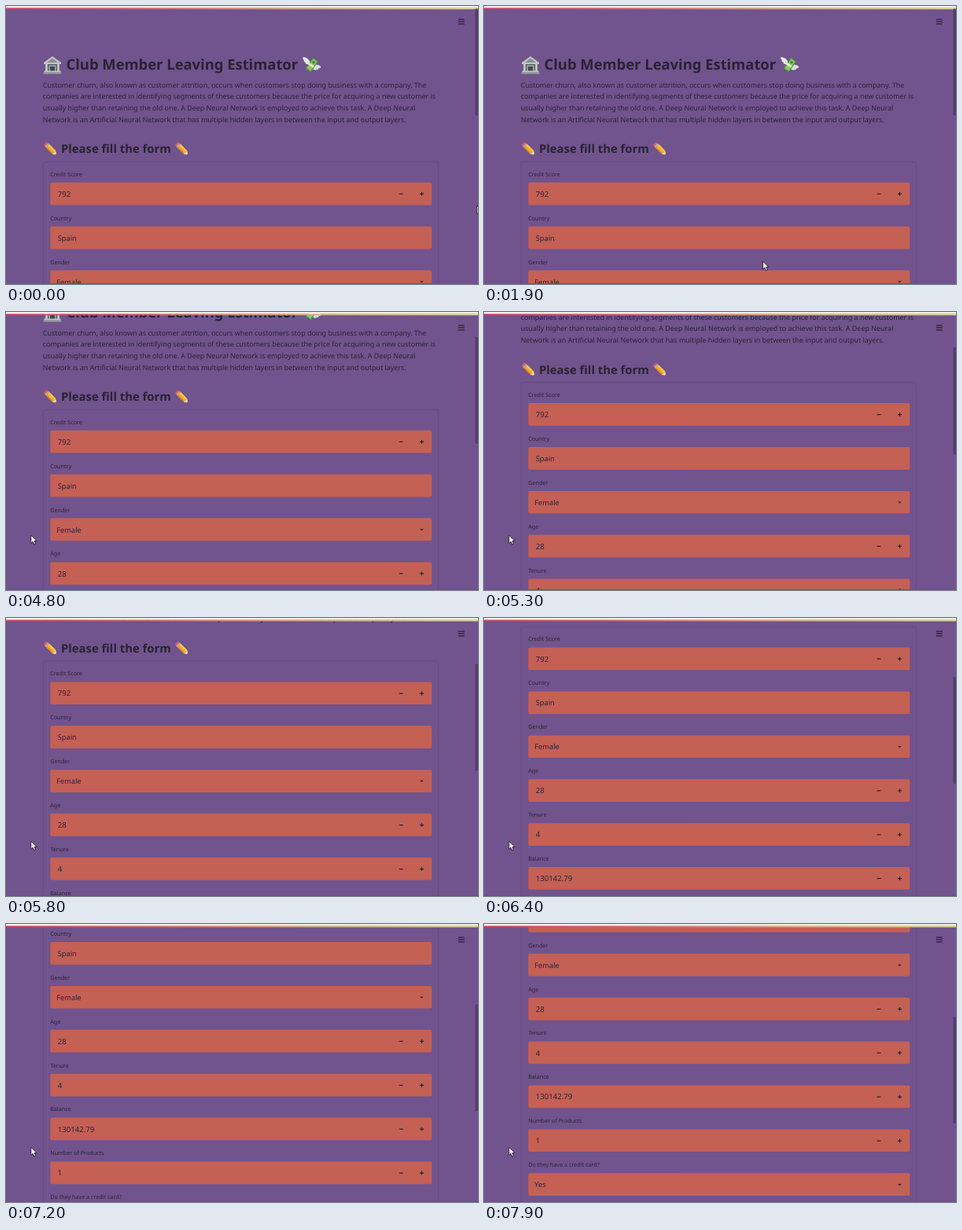
These frames come from a looping animation (600x354 px, 8000 ms). An HTML page:

```html
<!DOCTYPE html>
<html lang="en">
<head>
<meta charset="utf-8">
<title>Form scroll</title>
<style>
  html, body { margin: 0; width: 100%; height: 100%; overflow: hidden; background: #71538d; }
  svg { display: block; width: 600px; height: 354px; }
  text { font-family: "Noto Sans", "Open Sans", sans-serif; fill: #2b2438; text-rendering: geometricPrecision; }
  .title { font-size: 18.4px; font-weight: 700; fill: #282333; }
  .sub { font-size: 14.85px; font-weight: 700; fill: #282333; }
  .body { font-size: 8.92px; fill: #2a2339; }
  .label { font-size: 7.18px; fill: #2c2439; }
  .word { font-size: 9.25px; }
  .num { font-size: 9.65px; }
  .field { fill: #c56055; }
  .ink { fill: none; stroke: #2b2030; stroke-width: 1.25; }
</style>
</head>
<body>
<svg viewBox="0 0 600 354">
  <defs>
    <linearGradient id="stripe">
      <stop offset="0" stop-color="#cb3f66"/>
      <stop offset=".25" stop-color="#cf5f6c"/>
      <stop offset=".6" stop-color="#d9a57c"/>
      <stop offset="1" stop-color="#e0dd90"/>
    </linearGradient>
    <g id="pencil">
      <g transform="rotate(45)">
        <rect x="-10.500" y="-3" width="4" height="6" rx="1.600" fill="#dd5a68"/>
        <rect x="-7.800" y="-3" width="2" height="6" fill="#a9b4ba"/>
        <rect x="-5.800" y="-3" width="11.500" height="6" fill="#f5ac30"/>
        <rect x="-5.800" y="-3" width="11.500" height="2" fill="#fbc848"/>
        <rect x="-5.800" y="1.400" width="11.500" height="1.600" fill="#e28a24"/>
        <path d="M5.700-3 11 0 5.700 3z" fill="#f0d3a4"/>
        <path d="M9.200-1 11 0 9.200 1z" fill="#3a3234"/>
      </g>
    </g>
    <g id="bank">
      <path d="M1 8 12 0 23 8V10H1z" fill="#bfc5c4"/>
      <path d="M5 8 12 2.500 19 8z" fill="#858f92"/>
      <path d="M3 10H21V19H3z" fill="#5b6468"/>
      <path d="M4.500 10V19M19.500 10V19" stroke="#c9cdca" stroke-width="2.600"/>
      <path d="M7.500 11.500h9V19h-9z" fill="#a3aaa9"/>
      <path d="M9 13h6v6H9z" fill="#41484f"/>
      <path d="M1.500 18.500h21v2h-21z" fill="#c2c6c1"/>
      <path d="M.5 20.500h23v2H.5z" fill="#989f9b"/>
    </g>
    <g id="cash">
      <path d="M10 8C8 2 3 0 0 1 0 3 1 4 2 4.500 1 6 2 7 3.500 7 3 9 5 10 9 10z" fill="#e4e9e9"/>
      <path d="M14 12C17 9 21 10 23.500 13 23 14.500 21.500 15 20.500 14.500 20.500 16.500 19 17 17.500 16.500 16.500 18 14 17 12 15z" fill="#d5dddd"/>
      <path d="M13.500 1 20 6 10.500 20 3.500 15z" fill="#4a963f"/>
      <path d="M13.500 2.700 18.300 6.300 10.200 18.200 5.200 14.600z" fill="#8fc46a"/>
      <path d="M8.300 7.400 14.800 12.100 13.200 14.300 6.800 9.700z" fill="#f0e9bd"/>
      <circle cx="14" cy="7.300" r="1.700" fill="#3d8237"/>
    </g>
  </defs>
  <rect width="600" height="354" fill="#71538d"/>
  <g id="page"></g>
  <rect y="353" width="600" height="1" fill="#6a5082"/>
  <rect width="600" height="2.600" fill="#f4eee8"/>
  <rect y="2.600" width="600" height="1.600" fill="url(#stripe)"/>
  <path class="ink" d="M574.800 17h8M574.800 19.900h8M574.800 22.800h8"/>
  <rect id="thumb" x="596.500" width="4" height="136" rx="1" fill="#523f68"/>
  <path id="cursor" d="M0 0V10.200L2.400 8 4 11.800 5.800 11 4.200 7.300H7.300z" fill="#fff" stroke="#1d1824" stroke-width=".9" stroke-linejoin="round"/>
</svg>
<script>
const LOOP = 8000, STEP = 100;
const FIELD_TOP = 224.8, PITCH = 55.9;

const intro = [
  "Customer churn, also known as customer attrition, occurs when customers stop doing business with a company. The",
  "companies are interested in identifying segments of these customers because the price for acquiring a new customer is",
  "usually higher than retaining the old one. A Deep Neural Network is employed to achieve this task. A Deep Neural",
  "Network is an Artificial Neural Network that has multiple hidden layers in between the input and output layers."
];

const fields = [
  ["Credit Score", "792", "num"],
  ["Country", "Spain", "word"],
  ["Gender", "Female", "select"],
  ["Age", "28", "num"],
  ["Tenure", "4", "num"],
  ["Balance", "130142.79", "num"],
  ["Number of Products", "1", "num"],
  ["Do they have a credit card?", "Yes", "select"]
];

// [time, scroll] and [time, x, y]
const scrollKeys = [[0, 0], [3800, 0], [4800, 74], [5800, 143.4], [6400, 187.2], [7200, 257.7], [7900, 298.8], [8000, 304]];
const cursorKeys = [[0, 598.9, 254.5], [900, 540, 308], [1800, 380, 330], [2700, 150, 286], [3300, 31.8, 284.3], [8000, 31.8, 284.3]];

const text = (cls, x, y, str) => `<text class="${cls}" x="${x}" y="${y}">${str}</text>`;
const icon = (id, x, y) => `<use href="#${id}" x="${x}" y="${y}"/>`;

function field([label, value, kind], i) {
  const y = FIELD_TOP + PITCH * i, mid = y + 14.6;
  const select = kind === "select";
  let out = text("label", 56.2, y - 8.1, label)
    + `<rect class="field" x="56.300" y="${y}" width="485" height="28.700" rx="2"/>`
    + text(select ? "word" : kind, select ? 64.3 : 65.7, mid + 3.4, value);
  if (kind === "num")
    out += `<path class="ink" d="M499.700 ${mid}h4.800M526.100 ${mid}h4.800M528.500 ${mid - 2.4}v4.800"/>`;
  if (select)
    out += `<path d="M526.300 ${mid - 1}h4.400l-2.200 2.300z" fill="#2b2030"/>`;
  return out;
}

const page = document.getElementById("page");
const thumb = document.getElementById("thumb");
const cursor = document.getElementById("cursor");

page.innerHTML = icon("bank", 47, 64)
  + text("title", 76.5, 81.4, "Club Member Leaving Estimator")
  + icon("cash", 377, 64.5)
  + intro.map((line, i) => text("body", 46.8, 103.6 + 14.7 * i, line)).join("")
  + icon("pencil", 57, 182.3)
  + text("sub", 70, 187.4, "Please fill the form")
  + icon("pencil", 224, 182.3)
  + `<rect x="47.300" y="198.300" width="502.400" height="560" rx="3" fill="none" stroke="#674d82" stroke-width=".9"/>`
  + fields.map(field).join("");

function at(keys, t) {
  const i = Math.max(1, keys.findIndex(k => k[0] >= t));
  const a = keys[i - 1], b = keys[i];
  const p = (t - a[0]) / (b[0] - a[0]);
  return a.slice(1).map((v, n) => v + (b[n + 1] - v) * p);
}

function draw(now) {
  const t = Math.floor((now % LOOP) / STEP) * STEP;
  const [scroll] = at(scrollKeys, t);
  const [x, y] = at(cursorKeys, t);
  page.setAttribute("transform", `translate(0 ${-scroll})`);
  thumb.setAttribute("y", 3.5 + scroll * 0.383);
  cursor.setAttribute("transform", `translate(${x} ${y})`);
}

const start = performance.now();
function tick() {
  draw(performance.now() - start);
  requestAnimationFrame(tick);
}
tick();
</script>
</body>
</html>
```
